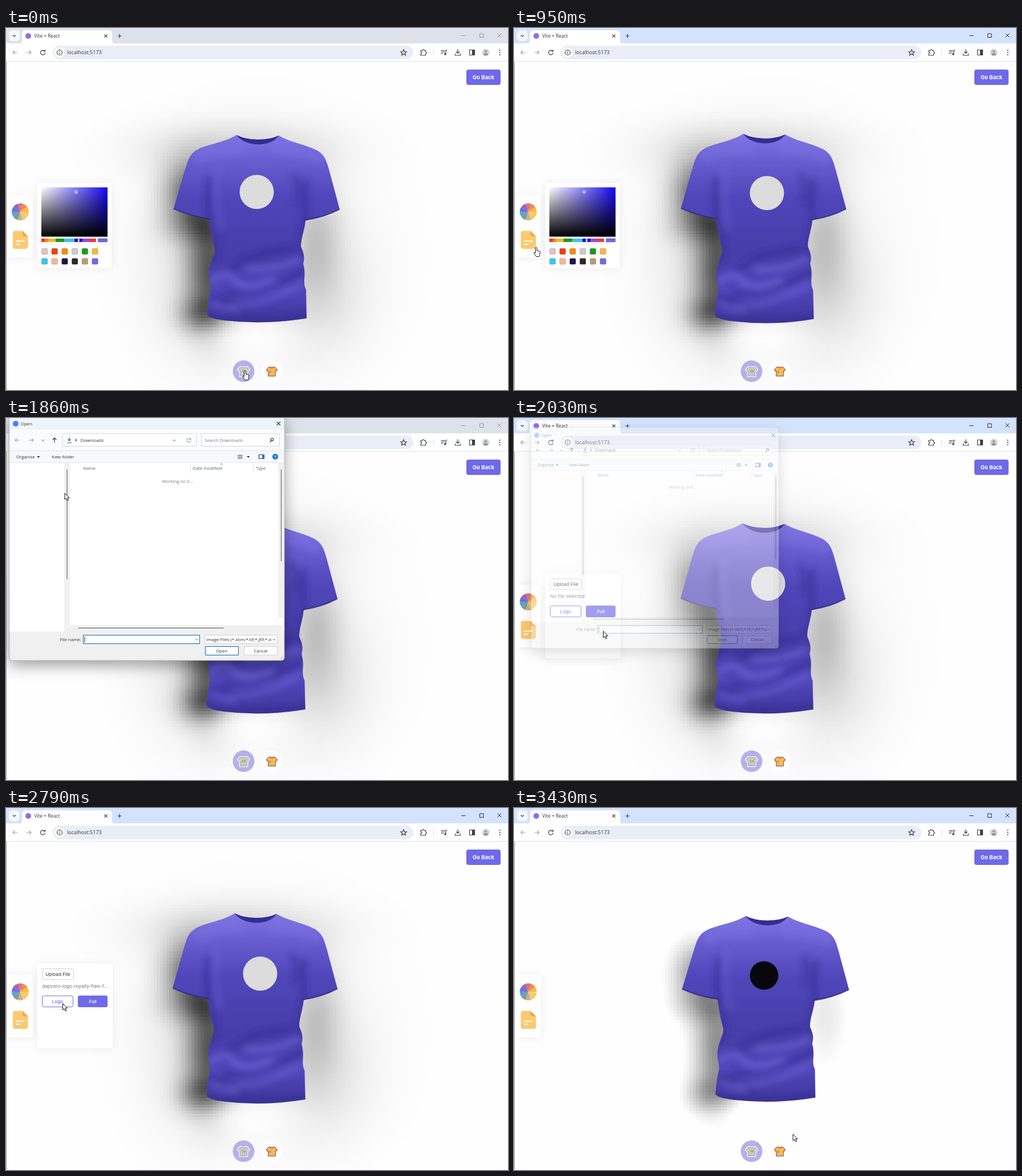
Recreate the animation shown at these times as an HTML page with a canvas. Size 880 px wide and 636 px high, loop 3.52 s.

```html
<!DOCTYPE html>
<html lang="en">
<head>
<meta charset="utf-8">
<title>Shirt customiser</title>
<style>
  html, body { margin: 0; width: 100%; height: 100%; overflow: hidden; background: #fefefe; }
  canvas, svg { position: absolute; left: 0; top: 0; width: 880px; height: 636px; }
  canvas { image-rendering: pixelated; }
  text { font-family: "Open Sans", "Noto Sans", sans-serif; fill: #333; white-space: pre; }
  .inter text, text.inter { font-family: Inter, sans-serif; }
  .mid { text-anchor: middle; }
  .line { fill: none; stroke: #3c3f43; stroke-width: 1.2; }
  .dim { stroke: #a3a6aa; }
  .card { fill: #fff; filter: drop-shadow(0 1px 7px rgba(90, 90, 130, .11)); }
  .fold { fill: none; stroke-linecap: round; }
  #strip { fill: #d3e3fd; }
  #controls { fill: none; stroke: #26292e; }
  .inactive #strip { fill: #dde2ea; }
  .inactive #controls { stroke: #92969c; }
  #dialog { filter: drop-shadow(0 9px 13px rgba(0, 0, 0, .36)); }
  #dialog text { font-size: 7.8px; }
  #cursor path { fill: #fff; stroke: #15151c; stroke-width: 1; stroke-linejoin: round; }
</style>
</head>
<body>
<canvas id="soft" width="160" height="116"></canvas>
<canvas id="tight" width="160" height="116"></canvas>

<svg id="stage" viewBox="0 0 880 636">
  <defs>
    <linearGradient id="cloth" gradientUnits="userSpaceOnUse" x1="0" y1="188" x2="0" y2="520">
      <stop offset="0" stop-color="#8075e2"/><stop offset=".14" stop-color="#685dcf"/>
      <stop offset=".33" stop-color="#4f46b9"/><stop offset=".64" stop-color="#463da9"/>
      <stop offset=".82" stop-color="#5047bb"/><stop offset="1" stop-color="#3d3499"/>
    </linearGradient>
    <linearGradient id="sat"><stop stop-color="#fff"/><stop offset="1" stop-color="#1607f2"/></linearGradient>
    <linearGradient id="val" x2="0" y2="1"><stop stop-opacity="0"/><stop offset="1"/></linearGradient>
    <filter id="blur" filterUnits="userSpaceOnUse" x="260" y="160" width="360" height="390"><feGaussianBlur stdDeviation="6"/></filter>
    <path id="body" d="M404 188C384 201 350 205 335 214C322 221 319 233 315 245L293.500 318Q322 331 356 336C357 350 361 370 366 388C366 400 358 410 356 428C354 440 361 452 358 464C354 480 354 492 352.500 504Q358 511 385 514Q455 522 527 510L526 460C519 446 527 436 521 414C525 400 520 392 517 384C517 368 524 354 525 338Q558 333 585 319L566 248C561 230 557 222 545 215C520 203 498 201 478 189Q464 196 442 196Q420 196 404 188Z"/>
    <clipPath id="inside"><use href="#body"/></clipPath>
    <path id="tee" d="M-4-9Q0-7 4-9L7-8 11-3 8 0 7-1V9H-7V-1L-8 0-11-3-7-8Z"/>
  </defs>

  <!-- shirt -->
  <g id="shirt">
    <use href="#body" fill="url(#cloth)"/>
    <g clip-path="url(#inside)">
      <g filter="url(#blur)">
        <g class="fold" stroke="#30298a">
          <path stroke-width="9" opacity=".6" d="M357 265Q352 300 358 340M527 270Q522 300 526 340"/>
          <path stroke-width="11" opacity=".4" d="M360 345Q374 375 362 415M522 345Q512 375 520 400M505 262Q520 280 508 305"/>
          <path stroke-width="11" opacity=".45" d="M385 465Q450 466 522 428M395 425Q430 392 500 388"/>
          <path stroke-width="7" opacity=".7" d="M355 508Q440 520 527 507M360 474Q395 476 420 498"/>
        </g>
        <g class="fold" stroke="#7d73e4">
          <path stroke-width="25" opacity=".4" d="M340 225Q375 207 408 212M478 211Q520 211 546 228"/>
          <path stroke-width="9" opacity=".55" d="M360 445Q385 424 402 444T468 442M425 424Q480 424 516 405"/>
          <path stroke-width="8" opacity=".4" d="M395 488Q450 490 518 450M364 484Q375 494 405 494"/>
          <path stroke-width="12" opacity=".2" d="M372 250Q366 300 377 350"/>
        </g>
      </g>
      <path class="fold" stroke="#29226f" stroke-width="3" d="M293 318Q322 331 356 336M525 338Q558 333 586 319"/>
    </g>
    <path fill="#342c93" d="M404 188Q420 196 442 196Q464 196 478 189Q468 204 443 204.500Q416 204 404 188Z"/>
  </g>
  <circle id="print"/>

  <!-- browser chrome -->
  <rect id="strip" width="880" height="28"/>
  <rect x="5" y="4" width="19" height="19" rx="6" fill="#fff" opacity=".72"/>
  <path class="line" d="M12 12.500l2.500 2.500 2.500-2.500"/>
  <path fill="#fff" d="M22 28Q28 28 28 22V11Q28 4 35 4H179Q186 4 186 11V22Q186 28 192 28Z"/>
  <circle cx="39" cy="14" r="5" fill="#8c6cf3"/>
  <text x="49.500" y="17" font-size="8.300">Vite + React</text>
  <path class="line" d="M172.500 11.500l5 5m0-5l-5 5M195.500 14h7m-3.500-3.500v7"/>
  <path id="controls" d="M798.500 13.500h7M830.500 10h6.500v6.500h-6.500zM861.500 9.500l7 7m0-7l-7 7"/>
  <rect y="27" width="880" height="31" fill="#fff"/>
  <path stroke="#dfe1e5" d="M0 58.500H880"/>
  <path class="line dim" d="M20 43H12m3.500-3.500L12 43l3.500 3.500M36 43h8m-3.500-3.500L44 43l-3.500 3.500"/>
  <path class="line" d="M67.500 40.500A4 4 0 1 0 68.500 43.500M68.500 38v3h-3"/>
  <rect x="82" y="31" width="632" height="24" rx="12" fill="#e9edf7"/>
  <circle cx="94" cy="43" r="9" fill="#fff"/>
  <circle class="line" cx="94" cy="43" r="4.500"/>
  <path class="line" d="M94 42.500v3M94 40v1.200"/>
  <text x="107" y="46.300" font-size="9">localhost:5173</text>
  <path class="line" d="M697 38l1.500 3.500 3.700.3-2.800 2.400.9 3.600-3.300-2-3.300 2 .9-3.600-2.800-2.400 3.700-.3z"/>
  <path class="line" d="M727 39.500h3q0-2 1.500-2t1.500 2h2.500v2.500q2 0 2 1.500t-2 1.500v3H727v-3q2 0 2-1.500t-2-1.500z"/>
  <path stroke="#d3dcf0" d="M749.500 38v10"/>
  <path class="line" d="M762.500 39.500h7m-7 2.500h7m-7 2.500h4M771 46v-7h2.500"/>
  <circle cx="769.800" cy="46" r="1.800" fill="#3c3f43"/>
  <path class="line" d="M792 37.500v7m-3-3l3 3 3-3M787.500 45v3h9v-3M812.500 38.500h9v9h-9z"/>
  <path fill="#3c3f43" d="M817 38.500h4.500v9H817z"/>
  <circle cx="841" cy="43" r="6.500" fill="#d2d3d5"/>
  <path fill="#929498" d="M837 47q0-3 4-3t4 3q-4 2.500-8 0z"/><circle cx="841" cy="41" r="2" fill="#929498"/>
  <g fill="#3c3f43"><circle cx="865.500" cy="39" r="1.100"/><circle cx="865.500" cy="43" r="1.100"/><circle cx="865.500" cy="47" r="1.100"/></g>
  <path stroke="#999ba0" d="M.5 59V636"/>

  <!-- page controls -->
  <rect x="807" y="73" width="60" height="27" rx="4" fill="#6f69e8"/>
  <text class="inter mid" x="837" y="90" font-size="9.500" font-weight="700" style="fill:#fff">Go Back</text>
  <rect class="card" x="3" y="293" width="44" height="110" rx="3"/>
  <g id="wheel" transform="translate(25 323)"></g>
  <path fill="#fdc96f" d="M16 356.500H29L38.500 366V384Q38.500 388 34.500 388H16Q12 388 12 384V360.500Q12 356.500 16 356.500Z"/>
  <path fill="#f0a64c" d="M29 356.500L38.500 366H33Q29 366 29 362Z"/>
  <path stroke="#fff" stroke-width="2" d="M17.500 374.500H32.500M17.500 380H25"/>
  <circle cx="416.500" cy="603" r="19" fill="#b5b0eb"/>
  <use href="#tee" x="416.500" y="603.500" fill="#c6cbbd" stroke="#f4f4f2" stroke-width="1.600"/>
  <use href="#tee" transform="translate(416.500 603.500) scale(.86)" fill="none" stroke="#99a096" stroke-width=".8"/>
  <text class="mid" x="416.500" y="605" font-size="6" font-weight="700" style="fill:#8b918a">10</text>
  <circle cx="466" cy="603" r="19" fill="#fff" opacity=".75"/>
  <use href="#tee" transform="translate(466 603.500) scale(.9)" fill="#fdb850" stroke="#4b4763" stroke-width="1"/>
  <path fill="none" stroke="#ef6e4e" stroke-width="1.300" d="M462.500 596.500q3.500 2.500 7 0M457.500 600l2 3M474.500 600l-2 3"/>
  <path stroke="#4b4763" stroke-width=".9" d="M463 602v4"/>

  <g id="colours">
    <rect class="card" x="55" y="272" width="130" height="150" rx="3"/>
    <rect x="62" y="280" width="116" height="86.500" fill="url(#sat)"/>
    <rect x="62" y="280" width="116" height="86.500" fill="url(#val)"/>
    <circle cx="123" cy="288" r="2" fill="none" stroke="#fff" stroke-width="1.100"/>
    <g id="hues"></g>
    <rect x="126" y="370.500" width="2.500" height="5" fill="#fff"/>
    <rect x="161.500" y="370" width="16" height="6" fill="#6f69e8" stroke="#5952bd" stroke-width=".6"/>
    <path stroke="#eee" d="M55 379.500H185"/>
    <g id="swatches" stroke="#000" stroke-opacity=".2" stroke-width=".8"></g>
  </g>

  <g id="files" class="inter" font-size="8.200">
    <rect class="card" x="55" y="273" width="132" height="149" rx="3"/>
    <rect x="63.500" y="282.500" width="55" height="19" rx="3" fill="#fff" stroke="#cfd0d4"/>
    <text class="mid" x="91" y="295">Upload File</text>
    <text id="fileName" x="63.500" y="316" style="fill:#737680"></text>
    <rect x="63.500" y="330" width="54" height="19.500" rx="3" fill="#fff" stroke="#6f69e8"/>
    <text class="mid" x="90.500" y="342.800" font-weight="500" style="fill:#6f69e8">Logo</text>
    <rect x="126" y="329.500" width="52" height="20.500" rx="3" fill="#6f69e8"/>
    <text class="mid" x="152" y="342.800" font-weight="500" style="fill:#fff">Full</text>
  </g>

  <!-- file dialog -->
  <g id="dialog">
    <rect x="6" y="-6" width="482" height="432" rx="5" fill="#f0f0f0" stroke="#a9abb0" stroke-width=".8"/>
    <path fill="#eff4f9" d="M6.500 0h481v20H6.500z"/>
    <path fill="#fafbfd" d="M6.500 20h481v38H6.500z"/>
    <path fill="#f5f8fc" d="M6.500 58h481v21H6.500z"/>
    <path fill="#fff" d="M6.500 79h481v296h-481z"/>
    <path fill="#f1f1f1" d="M102 79h10v296h-10zM477 79h10v272h-10zM112 364h375v11H112z"/>
    <path stroke="#e3e5e9" d="M6.500 57.500h481M6.500 78.500h481M323.500 80v16M433.500 80v16"/>
    <circle cx="17" cy="10" r="5" fill="#4285f4"/>
    <text x="26" y="13">Open</text>
    <path class="line" d="M474.500 6.500l6.500 6.500m0-6.500l-6.500 6.500"/>
    <path class="line dim" d="M24 39h-8m3-3l-3 3 3 3M40 39h8m-3-3l3 3-3 3M62.500 38l2.500 2.500 2.500-2.500"/>
    <path class="line" d="M85 43v-8m-3.500 3.500L85 35l3.500 3.500"/>
    <path fill="#fff" stroke="#d4d7db" d="M99.500 27.500h234v22h-234zM342.500 27.500h137v22h-137z"/>
    <path class="line" style="stroke:#0b6eb5" d="M111 34v6m-2.500-2.500l2.500 2.500 2.500-2.500M107 43.500h8"/>
    <path class="line" d="M121.500 37l2 2-2 2"/>
    <text x="130.500" y="42">Downloads</text>
    <path class="line dim" d="M292.500 38l2.500 2.500 2.500-2.500M323.500 37.500a3.500 3.500 0 1 0 .5 2.500M324 35.500v2.500h-2.500"/>
    <text x="348" y="42" style="fill:#777">Search Downloads</text>
    <path class="line" d="M462.500 42.500l2.500-2.500"/><circle class="line" cx="466.500" cy="38" r="2.300"/>
    <text x="18" y="71">Organise</text>
    <text x="80" y="71">New folder</text>
    <path fill="#333" d="M54 67h5.500l-2.700 3zM422 67h5.500l-2.700 3z"/>
    <path class="line" d="M406 65.500h8.500M406 68h8.500M406 70.500h8.500M443.500 64.500h9v7h-9z"/>
    <path fill="#1479c9" d="M449 64h4v8h-4z"/>
    <circle cx="472" cy="68" r="5" fill="#0d78d4"/>
    <text class="mid" x="472" y="70.800" font-weight="700" style="fill:#fff">?</text>
    <text x="135" y="90.500" style="fill:#526078">Name</text>
    <text x="327" y="90.500" style="fill:#526078">Date modified</text>
    <text x="438" y="90.500" style="fill:#526078">Type</text>
    <path class="line dim" d="M376 82l2-2 2 2"/>
    <text x="273.500" y="114" style="fill:#777">Working on it...</text>
    <path stroke="#808080" stroke-width="1.500" stroke-linecap="round" d="M107 91V283M482.500 91V251M127 369H381"/>
    <text x="94.500" y="391.500">File name:</text>
    <path fill="#fff" stroke="#0a68b0" d="M135.500 381.500h204v15h-204zM349.500 401.500h58v15h-58z"/>
    <path stroke="#222" d="M138 384v10"/>
    <path fill="#fff" stroke="#d0d0d0" d="M348.500 381.500h127v15h-127zM417.500 401.500h58v15h-58z"/>
    <text x="351" y="391.500">Image Files (*.xbm;*.tif;*.jfif;*.ic</text>
    <path class="line dim" d="M331.500 388l2.500 2.500 2.500-2.500M467.500 388l2.500 2.500 2.500-2.500"/>
    <text class="mid" x="378" y="412">Open</text>
    <text class="mid" x="446.500" y="412">Cancel</text>
    <path stroke="#aaa" d="M480 424l5-5M483 424l2-2"/>
  </g>

  <g id="cursor">
    <path id="arrow" d="M.5.5V11.800L3 9.500 4.900 13.800 6.800 13 5 8.800H8.500Z"/>
    <path id="hand" d="M3.500 1.700a1.300 1.300 0 0 1 2.600 0V6l4.200.9q1.800.5 1.500 2.300l-.6 4-1 3.300H4.800L.9 10.600q0-1.800 1.700-1l.9.800Z"/>
    <circle id="busy" cx="9.500" cy="1.500" r="4.500" fill="#cdeafc" stroke="#1d8fdc" stroke-width="2.800"/>
  </g>
</svg>

<script>
const LOOP = 3520;
const $ = id => document.getElementById(id);
const show = (id, on) => { $(id).style.display = on ? '' : 'none'; };

// Each pose: start ms, shirt turn, cursor kind, cursor x, cursor y
const poses = [
  [0, 0, 'hand', 414, 602],
  [200, .02, 'hand', 414, 602],
  [350, .06, 'arrow', 275, 521],
  [490, .15, 'arrow', 147, 450],
  [640, .3, 'arrow', 99, 424],
  [790, .48, 'hand', 35, 388],
  [950, .65, 'hand', 34, 385],
  [1100, .8, 'hand', 33, 384],
  [1250, .92, 'hand', 33, 384],
  [1400, 1, 'hand', 67, 282],
  [1550, 1, 'busy', 75, 290],
  [1860, 1, 'arrow', 102.5, 131.5],
  [2030, 1, 'arrow', 156, 374],
  [2320, 1, 'arrow', 77, 341],
  [2460, 1, 'hand', 77, 341],
  [2620, 1, 'hand', 95, 343],
  [2790, 1, 'arrow', 99, 343],
  [2950, .75, 'arrow', 420, 510],
  [3130, .35, 'arrow', 475, 560],
  [3230, 0, 'arrow', 488.5, 572.5],
  [3330, -.35, 'arrow', 488.5, 572.5],
  [3430, -.6, 'arrow', 488.5, 572.5]
];

// Blobs of shade: centre, spread, strength
const core = [
  [325, 292, 33, 40, .54], [358, 425, 30, 70, .62],
  [343, 505, 29, 23, .34], [342, 350, 42, 22, .24], [545, 365, 30, 70, .17]
];
const halo = [
  [405, 215, 105, 32, .15], [545, 470, 62, 75, .09],
  [290, 430, 45, 100, .04], [450, 380, 130, 130, .05]
];
const bell = (x, y, [cx, cy, sx, sy, a]) =>
  a * Math.exp(-(((x - cx) / sx) ** 2 + ((y - cy) / sy) ** 2) / 2);

function paintShade(id, blobs, gain, cut) {
  const g = $(id).getContext('2d'), cell = 5.5;
  for (let i = 0; i < 160; i++) for (let j = 0; j < 116; j++) {
    const x = (i + .5) * cell, y = (j + .5) * cell;
    const sum = blobs.reduce((s, b) => s + bell(x, y, b), 0);
    const a = gain * sum * (1 - bell(x, y, [435, 550, 55, 22, .85])) - cut;
    if (a <= .004) continue;
    g.fillStyle = `rgba(0,0,0,${Math.min(a, .84)})`;
    g.fillRect(i, j, 1, 1);
  }
}

function drawColours() {
  const slices = '#e2766a #ee8b52 #f2bd45 #f7cb62 #fdc46b #c5b489 #7f9b90 #5f9fd8 #6672d4 #9a62c8'.split(' ');
  const rim = k => [Math.sin(k * Math.PI / 5 - .3) * 15, -Math.cos(k * Math.PI / 5 - .3) * 15];
  $('wheel').innerHTML = slices.map((c, k) =>
    `<path fill="${c}" d="M0 0L${rim(k)}A15 15 0 0 1 ${rim(k + 1)}Z"/>`).join('');

  const stops = [62, 68, 74, 87, 102, 120, 134, 147, 158];
  const hues = '#f2371c #f5860f #edb92c #1b9a1d #3cc4ec #1b10df #a940d6 #f33a3a'.split(' ');
  $('hues').innerHTML = hues.map((c, k) =>
    `<rect x="${stops[k]}" y="370" width="${stops[k + 1] - stops[k]}" height="6" fill="${c}"/>`).join('');

  const chips = '#e5bfc2 #f53d12 #f78a10 #cbcbcb #1a9a1a #eebb45 #3cc6ee #fab592 #1b1843 #2e2727 #bb9b72 #6f69e8'.split(' ');
  $('swatches').innerHTML = chips.map((c, k) =>
    `<rect x="${62.3 + k % 6 * 17.7}" y="${k < 6 ? 387.3 : 404.8}" width="10.500" height="10.500" rx="2" fill="${c}"/>`).join('');
}

function render(t) {
  const [, turn, kind, x, y] = poses.findLast(p => p[0] <= t);
  const closing = t >= 2030, swapped = t >= 2950;

  $('stage').classList.toggle('inactive', t < 100 || (t >= 1710 && t < 2030));
  $('shirt').setAttribute('transform',
    `matrix(${1 - .008 * turn} 0 ${.006 * turn} ${1 + .0152 * turn} ${-1.1 * turn} ${-5.86 * turn})`);

  const print = swapped
    ? { cx: 442 + 6 * turn, cy: 296 + 3 * turn, r: 25, fill: '#08080c' }
    : { cx: 439.5 + 6 * turn, cy: 288 + 3 * turn, r: 30, fill: '#dcdcdd' };
  for (const k in print) $('print').setAttribute(k, print[k]);

  show('soft', !swapped);
  show('tight', swapped);
  show('colours', t < 1100);
  show('files', t >= 1100 && !swapped);
  $('fileName').textContent = t < 2320 ? 'No file selected' : 'dapvoro-logo-royalty-free-f...';

  show('dialog', t >= 1860 && t < 2180);
  $('dialog').setAttribute('transform', closing ? 'translate(24.700 21.300) scale(.9)' : '');
  $('dialog').setAttribute('opacity', closing ? .35 : 1);

  show('hand', kind === 'hand');
  show('arrow', kind !== 'hand');
  show('busy', kind === 'busy');
  $('cursor').setAttribute('transform', `translate(${x} ${y})`);
}

function tick() {
  render(performance.now() % LOOP);
  requestAnimationFrame(tick);
}

paintShade('soft', [...core, ...halo], 1, 0);
paintShade('tight', core, .8, .06);
drawColours();
tick();
</script>
</body>
</html>
```
